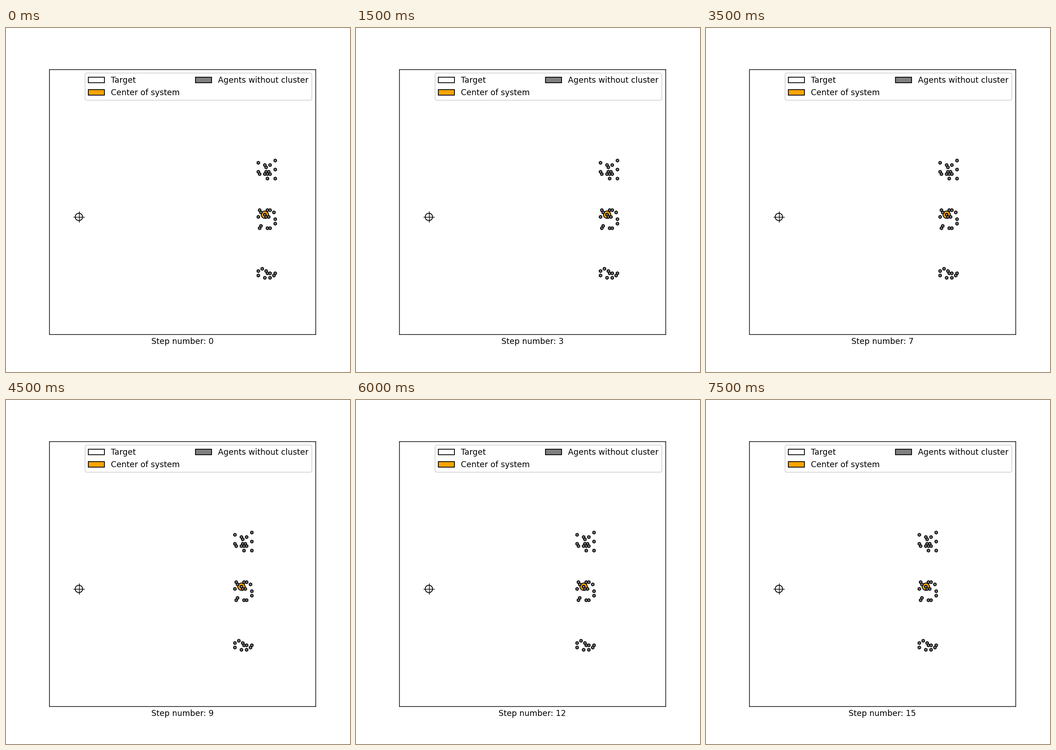
These frames come from a looping animation (748x748 px, 8000 ms). A matplotlib script:

```python
import numpy as np
import matplotlib.pyplot as plt
from matplotlib.animation import FuncAnimation
from matplotlib.collections import PolyCollection
from matplotlib.patches import Circle, Patch

SIZE, DPI = 748, 125
STEPS, STEP_MS = 16, 500

# Hexagonal lattice in stage pixels, centred on the goal
UNIT, ROW = 5.655, 4.903
GOAL = np.array([158.5, 410.8])
START_COL = 69

# row -> agent offsets in half columns
AGENTS = {
    25: [13], 24: [0], 23: [5, 9], 22: [6], 21: [13], 20: [0, 6, 8],
    19: [1, 5, 7, 9], 17: [7, 13],
    3: [1, 7, 9], 2: [2, 12], 1: [5], 0: [0, 6, 8], -1: [13], -3: [13],
    -4: [2], -5: [1, 7, 9],
    -23: [3], -24: [0, 6], -25: [7, 9, 13], -26: [0, 12], -27: [5, 9],
}


def place(half, row, step=0):
    col = START_COL + half / 2 - step
    return GOAL + [col * UNIT, -row * ROW]


angles = np.radians(30 + 60 * np.arange(6))
hexagon = np.column_stack([np.cos(angles), np.sin(angles)]) * UNIT / np.sqrt(3)


def cells(step):
    return [place(half, row, step) + hexagon
            for row, halves in AGENTS.items() for half in halves]


fig, ax = plt.subplots(figsize=(SIZE / DPI, SIZE / DPI), dpi=DPI)
fig.subplots_adjust(left=0.125, right=0.9, bottom=0.11, top=0.88)
ax.set(xlim=(0.125 * SIZE, 0.9 * SIZE), ylim=(0.89 * SIZE, 0.12 * SIZE))
ax.tick_params(bottom=False, left=False, labelbottom=False, labelleft=False)

radius = UNIT * np.sqrt(2)
gx, gy = GOAL
ax.add_patch(Circle(GOAL, radius, fc="white", ec="black", lw=1))
arm = 2 * UNIT
ax.plot([gx - arm, gx + arm], [gy, gy], color="black", lw=0.8)
ax.plot([gx, gx], [gy - arm, gy + arm], color="black", lw=0.8)

center = ax.add_patch(Circle(place(5, 1), radius, fc="orange", ec="black", lw=1))
agents = PolyCollection(cells(0), facecolors="gray", edgecolors="black",
                        linewidths=1, joinstyle="miter", zorder=3)
ax.add_collection(agents, autolim=False)

entries = [("white", "Target"), ("orange", "Center of system"),
           ("gray", "Agents without cluster")]
ax.legend(handles=[Patch(fc=color, ec="black", lw=1, label=label)
                   for color, label in entries],
          loc="upper right", ncol=2)


def update(step):
    agents.set_verts(cells(step))
    center.center = place(5, 1, step)
    ax.set_xlabel(f"Step number: {step}")
    return agents, center


anim = FuncAnimation(fig, update, frames=STEPS, interval=STEP_MS,
                     repeat=True, repeat_delay=0)
plt.show()
```
